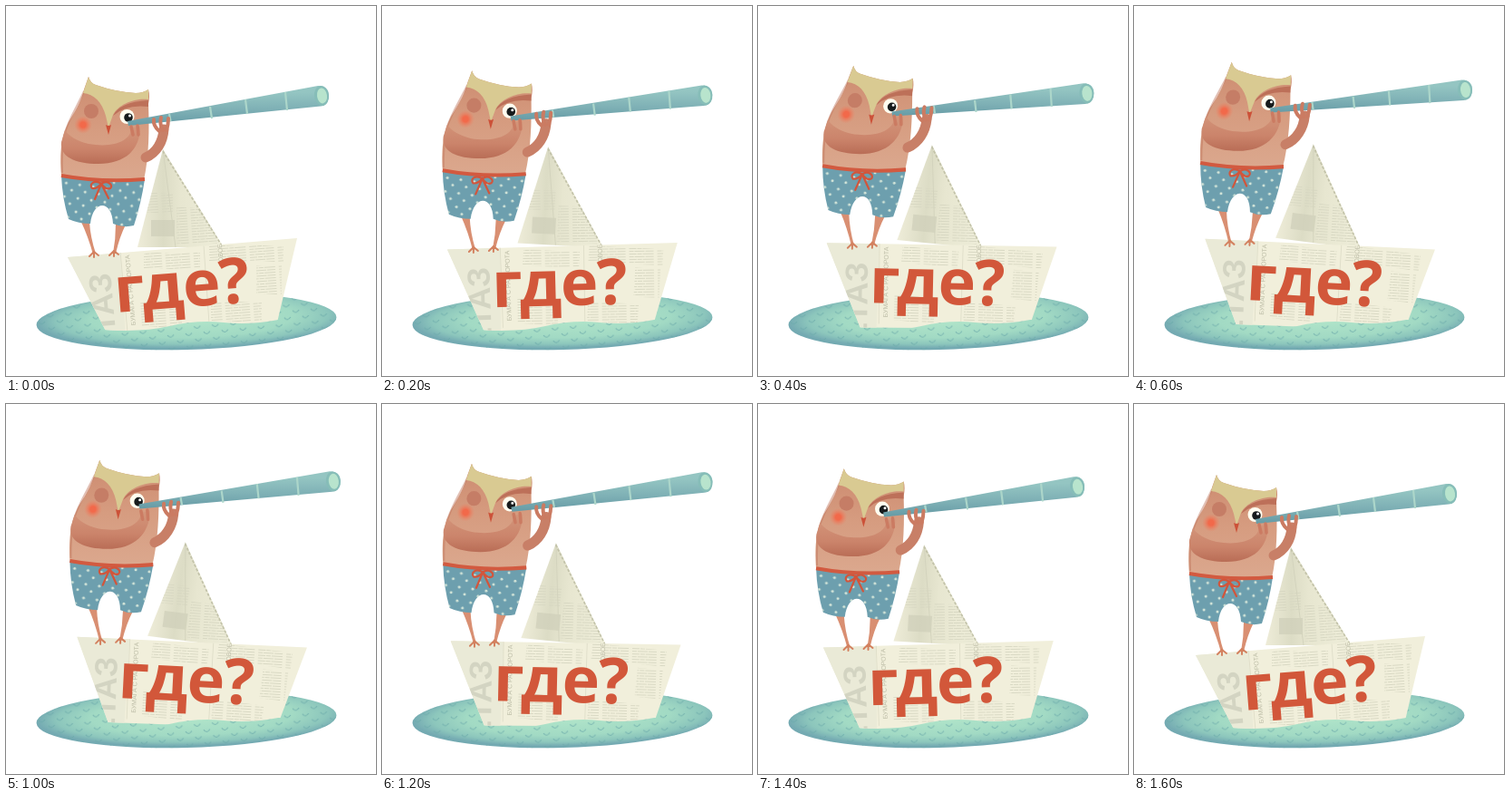
An HTML page for the animation above (1.8 s loop, 408 by 408 pixels).

```html
<!DOCTYPE html>
<html lang="ru">
<head>
<meta charset="utf-8">
<title>где?</title>
<style>
html, body { margin: 0; width: 100%; height: 100%; overflow: hidden; background: #fff; }
svg { display: block; width: 100vw; height: 100vh; }

/* Nine held poses: --roll swings out and back, --lag separates the two halves. */
@property --step { syntax: "<number>"; inherits: true; initial-value: 0; }
@keyframes rock { to { --step: 9; } }
svg {
  animation: rock 1.8s steps(9) -1ms infinite;
  --roll: sin(var(--step) * 22.5deg);
  --lag: sin(var(--step) * 45deg);
}
.boat {
  transform-origin: 230px 347px;
  transform: rotate(calc(var(--roll) * 8deg));
}
.owl {
  transform: matrix(1, 0,
    calc(var(--roll) * -.037 - var(--lag) * .011),
    calc(1 + var(--roll) * .022),
    calc(var(--roll) * 18.6 + var(--lag) * 4),
    calc(var(--roll) * -19.2));
}
.scope {
  transform-origin: 135px 129px;
  transform:
    translate(calc(var(--roll) * 15.4px + var(--lag) * 2.5px),
              calc(var(--roll) * -16.8px + var(--lag) * 1.4px))
    rotate(calc(var(--roll) * 1.6deg + var(--lag) * 1deg));
}
.masthead { font: bold 35px "Liberation Sans", Arial, sans-serif; fill: #d3d4c2; }
.tiny { font: 7px "Liberation Sans", Arial, sans-serif; fill: #bcbca6; }
.lettering { font: bold 70px "Open Sans", "Noto Sans", sans-serif; letter-spacing: -1px; fill: #d2573a; }
</style>
</head>
<body>
<svg viewBox="0 0 408 408">
  <defs>
    <radialGradient id="sea" cx=".52" cy=".45" r=".52">
      <stop offset="0" stop-color="#b2e6ca"/>
      <stop offset=".65" stop-color="#a2dac4"/>
      <stop offset=".87" stop-color="#8cc6bc"/>
      <stop offset="1" stop-color="#74aab2"/>
    </radialGradient>
    <linearGradient id="skin" x2="0" y2="1">
      <stop offset="0" stop-color="#cc8a6f"/>
      <stop offset=".5" stop-color="#d69c80"/>
      <stop offset="1" stop-color="#dba88e"/>
    </linearGradient>
    <linearGradient id="limb" x2="0" y2="1">
      <stop offset="0" stop-color="#d3957a"/>
      <stop offset=".6" stop-color="#cb846b"/>
      <stop offset="1" stop-color="#b96d56"/>
    </linearGradient>
    <linearGradient id="tube" x2=".1" y2="1">
      <stop offset=".25" stop-color="#94c5c2"/>
      <stop offset=".65" stop-color="#7eb0b5"/>
      <stop offset="1" stop-color="#659aa5"/>
    </linearGradient>
    <linearGradient id="fold">
      <stop offset="0" stop-color="#eeecd8"/>
      <stop offset=".3" stop-color="#dcdcc5"/>
      <stop offset=".5" stop-color="#e7e6d0"/>
      <stop offset="1" stop-color="#efeeda"/>
    </linearGradient>
    <radialGradient id="blush">
      <stop offset=".3" stop-color="#f2694a"/>
      <stop offset="1" stop-color="#e98668" stop-opacity="0"/>
    </radialGradient>
    <pattern id="scales" width="20" height="14" patternUnits="userSpaceOnUse" patternTransform="rotate(-4)">
      <path d="M2 3q3 5 7 0M12 10q3 5 7 0" fill="none" stroke="#6aa9aa" stroke-width="1.1" opacity=".8"/>
    </pattern>
    <pattern id="print" width="31" height="6" patternUnits="userSpaceOnUse" patternTransform="rotate(-4)">
      <path d="M1 1.5h8m1 0h5m1 0h12M1 4.5h5m1 0h11m1 0h9" stroke="#d6d6c1" stroke-width=".9"/>
    </pattern>
    <pattern id="dots" width="15" height="15" patternUnits="userSpaceOnUse" patternTransform="rotate(8)">
      <g fill="#d5e6d9"><circle cx="3" cy="4" r="1.5"/><circle cx="10" cy="11" r="1.5"/></g>
    </pattern>
    <ellipse id="pond" cx="199" cy="347.500" rx="165.500" ry="31.500" transform="rotate(-1.5 199 347.500)"/>
    <path id="hull" d="M68 277L321 256L299 349L114 366Z"/>
    <path id="cloth" d="M173 158L240 266H145Z"/>
    <path id="pants" d="M61 187Q105 196 153 191Q149 218 141 242Q129 245 118 240C117 214 96 213 93 240Q80 240 69 235Q62 212 61 187Z"/>
    <clipPath id="in-hull"><use href="#hull"/></clipPath>
    <clipPath id="in-cloth"><use href="#cloth"/></clipPath>
    <clipPath id="waterline">
      <path d="M0 0H408V346H300Q270 352 240 349T180 353T108 357H0Z"/>
    </clipPath>
  </defs>

  <rect width="408" height="408" fill="#fff"/>
  <use href="#pond" fill="url(#sea)"/>
  <use href="#pond" fill="url(#scales)"/>

  <g clip-path="url(#waterline)">
    <g class="boat">
      <use href="#cloth" fill="url(#fold)"/>
      <g clip-path="url(#in-cloth)">
        <path d="M188 222h52v40h-52zM150 206h34v22h-34z" fill="url(#print)"/>
        <path d="M160 236h26v18h-26z" fill="#cfcfb9" opacity=".7"/>
        <path d="M173 158L187 266" stroke="#d3d3bd"/>
        <path d="M173 160L238 264" stroke="#c3c3aa" stroke-width="2" stroke-dasharray="3 2"/>
      </g>
      <use href="#hull" fill="#f1efdb"/>
      <g clip-path="url(#in-hull)">
        <path d="M60 270L126 266L132 366H100Z" fill="#eaead7"/>
        <path d="M152 272h62v18h-62zM224 264h82v18h-82zM146 326h48v28h-48zM226 326h56v22h-56zM276 286h28v32h-28z" fill="url(#print)"/>
        <path d="M218 264L224 350M126 270L134 360" stroke="#e0dfca"/>
        <text class="masthead" transform="translate(123 383) rotate(-95)">ЕТАЗ</text>
        <text class="tiny" transform="translate(143 352) rotate(-95)">БУМАГА С РАЗВОРОТА</text>
        <text class="tiny" transform="translate(240 287) rotate(-95)">НОВОЕ</text>
      </g>
      <text class="lettering" transform="translate(121 338) rotate(-4.500)">где?</text>
    </g>
  </g>

  <g class="owl">
    <path d="M82 236L92 238Q93 255 99 273L96 274Q91 255 82 236ZM121 240L132 241Q125 255 121 273L118 273Q121 257 121 240Z" fill="#d98f72"/>
    <path d="M97 271l-5 5m5-5v6m0-6l5 4M119 270l-5 5m5-5v6m0-6l5 4" fill="none" stroke="#d3815f" stroke-width="2" stroke-linecap="round"/>
    <path d="M91 78Q93 85 99 87Q122 95 143 96Q151 96 157 92Q159 99 157 108C158 135 158 165 152 192Q105 194 61 187C59 160 61 145 69 128C79 112 84 101 86 92Z" fill="url(#skin)"/>
    <path d="M86 94C80 108 68 126 64 143Q61 160 62 184" fill="none" stroke="#bd7259" stroke-width="2" opacity=".45"/>
    <path d="M91 78Q93 85 99 87Q122 95 143 96Q151 96 157 92L157 103C143 101 124 108 118 120L113 134L110 121C106 106 97 97 85 96Z" fill="#d9ca92"/>
    <path d="M118 121Q125 106 157 104L157 111Q132 108 118 121Z" fill="#bd7059"/>
    <circle cx="94" cy="116" r="8" fill="#c57d66"/>
    <circle cx="85" cy="131" r="10" fill="url(#blush)"/>
    <path d="M110 131Q113 133 116 131L113 142Z" fill="#cc5138"/>
    <path d="M61 150C59 166 76 174 102 174C132 174 148 158 148 133L138 134C139 148 119 157 91 152C78 149 69 143 65 137Z" fill="url(#limb)"/>
    <use href="#pants" fill="#6d9fae"/>
    <use href="#pants" fill="url(#dots)"/>
    <path d="M61 187Q105 195 153 191" fill="none" stroke="#d25a40" stroke-width="4"/>
    <path d="M105 196C97 191 91 197 95 201Q100 202 105 196C112 191 119 198 115 201Q110 203 105 196L98 213M105 196L113 212" fill="none" stroke="#d2553b" stroke-width="2.200" stroke-linecap="round"/>
    <circle cx="133.500" cy="122" r="8" fill="#fffdf0"/>
    <circle cx="135" cy="123" r="4.800" fill="#171b1c"/>
    <circle cx="136.500" cy="121" r="1.500" fill="#fff"/>
    <path d="M154 167C166 162 173 150 174 136" fill="none" stroke="#c87f67" stroke-width="11" stroke-linecap="round"/>
  </g>

  <g class="scope">
    <path d="M134 127L344 88Q356 88 356 99Q355 110 347 110.500L135 132Z" fill="url(#tube)"/>
    <path d="M180 119l1.500 8M225 111l2 13M264 103l2 16M308 95l2 20" fill="none" stroke="#acd6ca" stroke-width="2.200"/>
    <g transform="rotate(-8 348 99)">
      <ellipse cx="348" cy="99" rx="8" ry="11" fill="#86bdb8"/>
      <ellipse cx="348.500" cy="99" rx="5.500" ry="8.500" fill="#b8e4cd"/>
    </g>
  </g>

  <g class="owl" fill="none" stroke="#cb7b62" stroke-width="4" stroke-linecap="round">
    <path d="M169 138Q162 132 163 125M173 137Q169 130 171 123M177 137Q179 131 179 124"/>
    <path d="M140 142L138 133M146 142L145 132" stroke-width="3.500"/>
  </g>
</svg>
</body>
</html>
```
